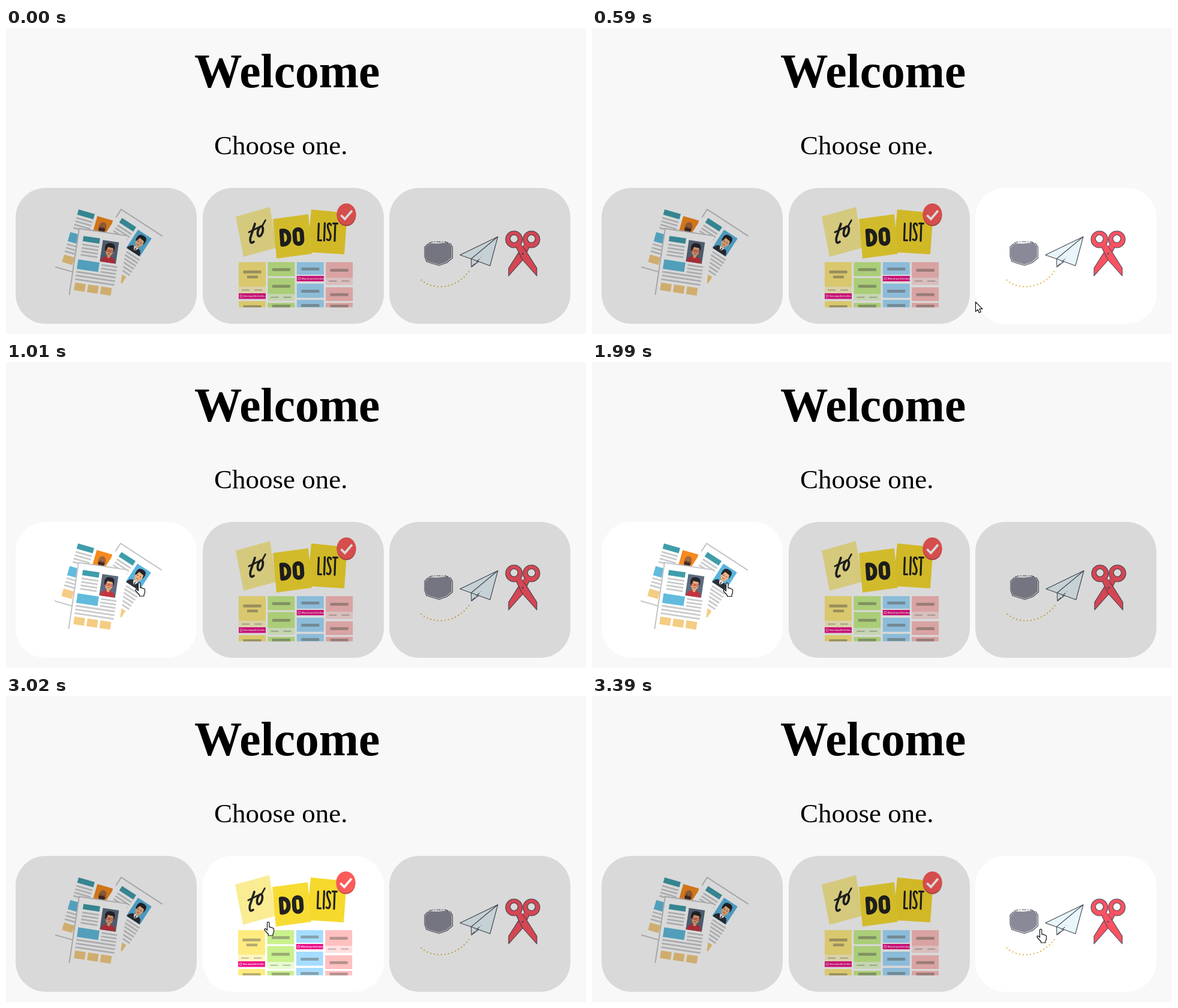
Animation, 967 px wide and 511 px high, one loop 4.23 s. Source, as an HTML page:

```html
<!DOCTYPE html>
<html lang="en">
<head>
<meta charset="utf-8">
<title>Welcome</title>
<style>
  html, body { margin: 0; width: 100%; height: 100%; overflow: hidden; background: #f8f8f8; }
  svg { display: block; width: 100%; height: 100%; }
  .title { font: bold 79.6px "Liberation Serif", "Times New Roman", serif; }
  .lead { font: 45px "Liberation Serif", "Times New Roman", serif; }
  .tiny { font: bold 3.1px "Open Sans", sans-serif; fill: #fff; }
  .card { filter: brightness(.85); }
  .card.lit { filter: none; }
  .card.lit .art { transform: translateX(-1px); }
  .brush { fill: none; stroke: #222; stroke-linecap: round; stroke-linejoin: round; }
  .ink { stroke: #474a55; stroke-width: 1.1; stroke-linejoin: round; }
  .pointer { fill: #fff; stroke: #111; stroke-width: 1.2; stroke-linejoin: round; }
</style>
</head>
<body>
<svg viewBox="0 0 967 511">
  <rect width="967" height="511" fill="#f8f8f8"/>
  <text class="title" x="314" y="99">Welcome</text>
  <text class="lead" x="347" y="211">Choose one.</text>

  <g class="card">
    <rect x="16" y="267" width="302" height="227" rx="50" fill="#fff"/>
    <g class="art" id="resumes"></g>
  </g>

  <g class="card">
    <rect x="328" y="267" width="302" height="227" rx="50" fill="#fff"/>
    <g class="art">
      <path fill="#faec93" d="M383 315L440 299L451 367L396 382Z"/>
      <path fill="#f6d92d" d="M509 303L569 309L564 378L502 374Z"/>
      <path fill="#f7dc33" d="M445 319L504 311L510 377L451 385Z"/>
      <g class="brush">
        <g stroke-width="3.8">
          <path d="M415 327L407.500 350Q406 362 413 357"/>
          <path d="M405 341L421 333" stroke-width="3"/>
          <ellipse cx="424" cy="339.500" rx="4" ry="8.500" transform="rotate(15 424 339.500)"/>
          <path d="M427 331L432.500 321" stroke-width="2.600"/>
        </g>
        <g stroke-width="7" transform="rotate(-4 477 349)">
          <path d="M460 337.500V360.500Q472 361 472 349Q472 337 460 337.500Z"/>
          <rect x="481.500" y="337" width="12" height="24" rx="6"/>
        </g>
        <g stroke-width="3.200" transform="rotate(2 535 340)">
          <path d="M521 327V355H526M531 326V355M541.500 329Q540 325 537 327C533 332 541.500 342 541.500 348Q541 357 535.500 353M545 326H552M548.500 326V355"/>
        </g>
      </g>
      <ellipse cx="567.500" cy="312.500" rx="16" ry="18.300" fill="#b94746"/>
      <ellipse cx="567.500" cy="311" rx="16" ry="18" fill="#fb5b59"/>
      <path d="M558.500 312.500L565 319L577 305" fill="none" stroke="#fff" stroke-width="3.800"/>
      <g id="board"></g>
    </g>
  </g>

  <g class="card">
    <rect x="639" y="267" width="302" height="227" rx="50" fill="#fff"/>
    <g class="art">
      <path fill="#898a97" d="M699 367L706 359.500L720 360L737 358L743 365V383L734 391L722 395L711 392L702 389L699 381Z"/>
      <g class="ink" fill="none">
        <path d="M741 360L744.500 366V384L735 392L722 396.500L710 393L701 390L698 381V366L704 360"/>
        <path d="M705 359L712 357L733 357L742 361" stroke-dasharray="7 2 2 2"/>
      </g>
      <path d="M692.500 421C712 438 752 438 775 402" fill="none" stroke="#dda925" stroke-width="2" stroke-dasharray=".1 5.9" stroke-linecap="round"/>
      <g class="ink" fill="#e8f6fb">
        <path d="M820 348.500L757 379L775.500 385.500L776 399L788 390L807 397Z"/>
        <path d="M820 348.500L775.500 385.500L788 390" fill="none"/>
        <path d="M776 399L792 383" fill="none" stroke-dasharray="8 3"/>
      </g>
      <g id="scissors"></g>
    </g>
  </g>

  <g id="cursor">
    <path class="pointer" id="arrow" d="M0 0V16L3.700 12.600L6 18L8.800 16.800L6.500 11.600H11.500Z"/>
    <path class="pointer" id="hand" d="M5.500 14V2.500a1.700 1.700 0 0 1 3.400 0V9.500q1.600-1 2.600.7q1.800-.9 2.600.9q2-.5 2.400 1.500V17.500L15 21V23.500H7.500V21.500L1.200 14.500q-.8-2 1-2.300q1.600.2 3.300 2.300Z"/>
  </g>
</svg>
<script>
const byId = id => document.getElementById(id);
const box = (x, y, w, h, fill) => `<rect x="${x}" y="${y}" width="${w}" height="${h}" fill="${fill}"/>`;

// Portrait inside a 27 by 36 frame
function portrait({ back, skin, hair, shirt, bald, glasses, tie }) {
  const top = bald ? '' : `<path d="M6 17Q3 3 14 3.500Q24 3 21 17L19 11L10 10L8 17Z" fill="${hair}"/>`;
  const beard = bald ? `<path d="M8 18Q14 16 19 18Q19 25 13.500 26Q8 25 8 18Z" fill="${hair}"/>` : '';
  const specs = glasses
    ? '<path d="M8 15H12.500V18H8ZM14.500 15H19V18H14.500ZM12.500 16H14.500" fill="none" stroke="#b3323c" stroke-width=".8"/>'
    : '<path d="M10 16H12M15 16H17" stroke="#222"/>';
  const collar = tie ? '<path d="M9 26L13.500 34L18 26Z" fill="#fff"/><path d="M13 27H14.500V34H13Z" fill="#333"/>' : '';
  return box(0, 0, 27, 36, back) +
    `<path d="M1 36Q2 27 10 26H17Q25 27 26 36Z" fill="${shirt}"/>
     <path d="M11 22H16V27L13.500 29L11 27Z" fill="${skin}"/>
     <ellipse cx="13.500" cy="16" rx="6.500" ry="9" fill="${skin}"/>` + beard + top + specs + collar +
    '<path d="M11.500 21H15.500" stroke="#7d332c" stroke-width=".8"/>';
}

function sheet(x, y, angle, edge, person) {
  const line = (lx, ly, w) => box(lx, ly, w, 2.8, '#c9cacc');
  let s = box(0, 0, 82, 113, '#fff');
  s += `<path d="${edge}" fill="none" stroke="#c4c5c7" stroke-width="2"/>`;
  s += box(9, 11, 28, 9, '#3f9daa');
  for (let i = 0; i < 4; i++) s += line(9, 24 + i * 5.8, 28);
  s += box(6, 51, 36, 16, '#61bbdc');
  for (let i = 0; i < 3; i++) s += line(46, 53 + i * 5.8, 26) + line(6, 70.5 + i * 6.2, 66);
  for (let i = 0; i < 3; i++) s += box(6.5 + i * 22, 90, 18, 13, '#f4cc82');
  s += `<g transform="translate(42 13)">${portrait(person)}</g>`;
  return `<g transform="translate(${x} ${y}) rotate(${angle})">${s}</g>`;
}

byId('resumes').innerHTML =
  sheet(115.5, 290, 16, 'M-2 114H32', { back: '#f58a1f', skin: '#a4673d', hair: '#3d2b25', shirt: '#34485a', bald: true }) +
  sheet(192, 303, 33, 'M0 16V0H82', { back: '#58b4de', skin: '#f0b283', hair: '#24252b', shirt: '#2c2f37', tie: true }) +
  sheet(122, 335, 8.5, 'M0 112V0H82', { back: '#5c6b80', skin: '#e9a878', hair: '#27242b', shirt: '#c3343f', glasses: true });

// Board columns: [kind, top, height]
const tones = [['#ffeb80', '#fff6c4'], ['#c9f18d', '#e8fbd0'], ['#a5ddff', '#d6f0ff'], ['#ffc0c0', '#ffe0e0']];
const columns = [
  [['note', 391, 41], ['foot', 432, 11], ['ask', 443, 9.5, 'How many like for this...'], ['note', 456, 10.5]],
  [['note', 391, 23.5], ['note', 417.5, 26.5], ['foot', 444, 11.5], ['note', 459, 7.5]],
  [['note', 391, 21], ['ask', 414, 9, 'What do you think about...'], ['note', 427, 23.5], ['note', 454, 12.5]],
  [['note', 391, 26], ['foot', 417, 12], ['note', 433, 23], ['note', 459, 7.5]]
];
byId('board').innerHTML = columns.map((items, c) => {
  const x = 388 + c * 48.4, bar = '#6b675f';
  const strip = (dx, y, w, h) => `<g opacity=".5">${box(x + dx, y, w, h, bar)}</g>`;
  return items.map(([kind, y, h, words]) => {
    if (kind === 'ask') return box(x, y, 45, h, '#ec148b') +
      `<circle cx="${x + 4}" cy="${y + h / 2}" r="2" fill="none" stroke="#fff" stroke-width=".7"/>
       <text class="tiny" x="${x + 8}" y="${y + h / 2 + 1.2}">${words}</text>`;
    if (kind === 'foot') return box(x, y, 45, h, tones[c][1]) + strip(5, y + 4.8, 13, 1.6) + strip(26, y + 4.8, 13, 1.6);
    const mid = h > 30 ? y + 14 : h < 9 ? y + 3 : h < 15 ? y + 7 : y + h * .43;
    const bars = strip(7.5, mid, 30, Math.min(4.8, y + h - mid)) + (h > 30 ? strip(14, y + 22.5, 18, 4.5) : '');
    return box(x, y, 45, h, tones[c][0]) + bars;
  }).join('');
}).join('');

const blade = `<path class="ink" fill="#fb5262" d="M850 365L859 362L868 374L885 401V414L861 387Z"/>
  <path class="ink" fill="#fb5262" fill-rule="evenodd" d="M833 353a14 14 0 1 0 28 0a14 14 0 1 0 -28 0M840.500 352a6.500 6.500 0 1 0 13 0a6.500 6.500 0 1 0 -13 0"/>
  <path d="M851.500 366L858.500 361L866 373L861.500 385Z" fill="#fb5262"/>`;
byId('scissors').innerHTML = `<g transform="matrix(-1 0 0 1 1723 0)">${blade}</g>${blade}
  <circle cx="861.500" cy="377" r="1.500" fill="#474a55"/>`;

// Pointer steps: time, x, y, lit card, arrow shape
const steps = [
  [0, 0, 0, -1],
  [540, 725, 488, 2], [590, 639.5, 457.5, 2, 1], [630, 565, 437, 1], [680, 495, 420, 1],
  [730, 430, 407, 1], [780, 370, 396, 1], [830, 318, 387, 1, 1], [880, 278, 380, 0],
  [920, 250, 374, 0], [960, 230, 370, 0], [1010, 215, 367.5, 0],
  [1990, 218, 368, 0], [2040, 235, 368, 0], [2090, 270, 370, 0], [2130, 312, 372, 0, 1],
  [2180, 350, 374, 1], [2220, 385, 375, 1], [2270, 412, 376, 1], [2320, 427, 376, 1],
  [3020, 430, 376.5, 1], [3070, 448, 378, 1], [3110, 490, 381, 1], [3160, 545, 384, 1],
  [3210, 605, 386, 1], [3250, 655, 388, 2], [3300, 700, 388, 2], [3350, 730, 388, 2], [3390, 741, 388.5, 2]
];
const loop = 4230;
const cards = [...document.querySelectorAll('.card')];
const start = performance.now();

function draw() {
  const t = (performance.now() - start) % loop;
  const [, x, y, lit, arrow] = steps.findLast(step => step[0] <= t);
  cards.forEach((card, i) => card.classList.toggle('lit', i === lit));
  byId('cursor').setAttribute('transform', `translate(${x} ${y})`);
  byId('cursor').style.display = lit < 0 ? 'none' : '';
  byId('arrow').style.display = arrow ? '' : 'none';
  byId('hand').style.display = arrow ? 'none' : '';
  requestAnimationFrame(draw);
}
draw();
</script>
</body>
</html>
```
